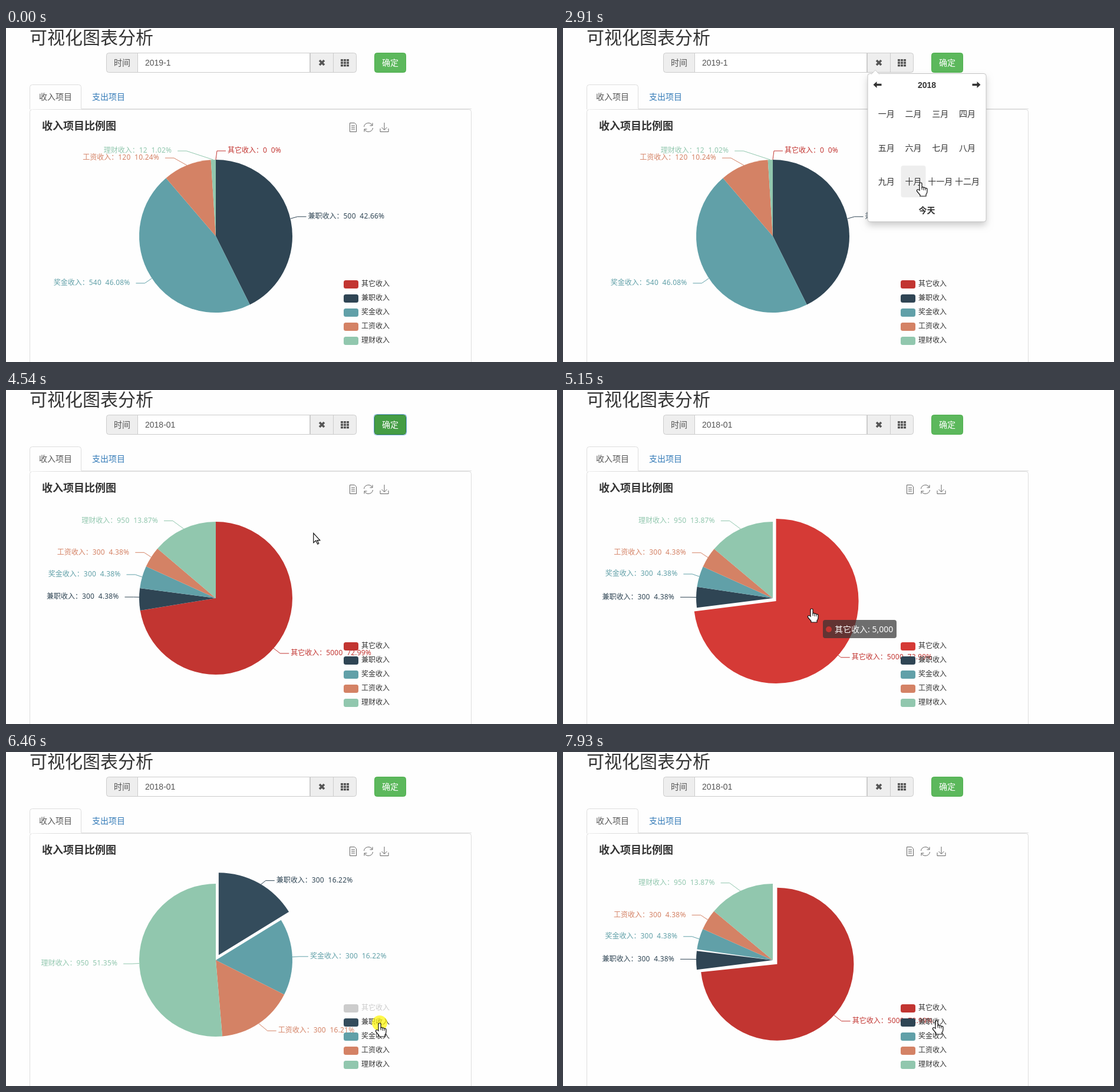
Write an HTML page with a canvas that moves like this. It is 935 px wide and 568 px high and loops after 8 s.

```html
<!DOCTYPE html>
<html lang="zh-CN">
<head>
<meta charset="utf-8">
<style>
html, body { margin: 0; width: 100%; height: 100%; overflow: hidden; background: #fefefe; }
canvas { display: block; }
</style>
</head>
<body>
<canvas id="stage" width="935" height="568"></canvas>
<script>
const ctx = document.getElementById('stage').getContext('2d');
const LOOP = 8000, TAU = Math.PI * 2;
const CHART = '"Noto Sans","Noto Sans CJK SC",sans-serif';
const PAGE = '"Liberation Sans","Noto Sans CJK SC",sans-serif';

// ---------- helpers ----------
const lerp = (a, b, p) => a + (b - a) * p;
const clamp = p => Math.max(0, Math.min(1, p));
const cubicOut = p => 1 - (1 - p) ** 3;
const smooth = p => p * p * (3 - 2 * p);
const elasticOut = p => p >= 1 ? 1 : 2 ** (-10 * p) * Math.sin((p - 0.1) * 5 * Math.PI) + 1;
const within = (t, from, to) => t >= from && t < to;

// Text is placed by its vertical centre.
function text(str, x, cy, { size = 14, color = '#333', font = PAGE, weight = 400, align = 'left' } = {}) {
  ctx.font = `${weight} ${size}px ${font}`;
  ctx.textAlign = align;
  ctx.fillStyle = color;
  ctx.fillText(str, x, cy + size * 0.36);
}

function box(x, y, w, h, radius, fill, stroke) {
  ctx.beginPath();
  ctx.roundRect(x, y, w, h, radius);
  if (fill) { ctx.fillStyle = fill; ctx.fill(); }
  if (stroke) { ctx.strokeStyle = stroke; ctx.lineWidth = 1; ctx.stroke(); }
}

function polyline(color, ...points) {
  ctx.beginPath();
  points.forEach(([x, y]) => ctx.lineTo(x, y));
  ctx.strokeStyle = color;
  ctx.lineWidth = 1;
  ctx.stroke();
}

function shape(path, x, y, fill, stroke, width = 1) {
  ctx.save();
  ctx.translate(x, y);
  const p = new Path2D(path);
  if (fill) { ctx.fillStyle = fill; ctx.fill(p); }
  if (stroke) { ctx.strokeStyle = stroke; ctx.lineWidth = width; ctx.stroke(p); }
  ctx.restore();
}

function disc(x, y, r, fill) {
  ctx.beginPath();
  ctx.arc(x, y, r, 0, TAU);
  ctx.fillStyle = fill;
  ctx.fill();
}

// ---------- pie data ----------
const NAMES = ['其它收入', '兼职收入', '奖金收入', '工资收入', '理财收入'];
const COLORS = ['#c23531', '#2f4554', '#61a0a8', '#d48265', '#91c7ae'];
const CX = 356, CY = 354, R = 130;

const PHASES = [
  { t: -1000, values: [0, 500, 540, 120, 12], picked: -1 },
  { t: 4300, values: [5000, 300, 300, 300, 950], picked: -1 },
  { t: 5040, values: [5000, 300, 300, 300, 950], picked: 0 },
  { t: 5840, values: [null, 300, 300, 300, 950], picked: 1 },
  { t: 6540, values: [null, null, 300, 300, 950], picked: 2 },
  { t: 6900, values: [5000, null, 300, 300, 950], picked: 0 },
  { t: 7770, values: [5000, 300, 300, 300, 950], picked: 0 },
];
const HOVERS = [[0, 4840, 5840], [1, 6060, 6540]];

// Percentages with two decimals that add up to exactly 100.
function percentages(values) {
  const total = values.reduce((a, b) => a + b, 0);
  const exact = values.map(v => v / total * 1e4);
  const units = exact.map(Math.floor);
  const order = exact.map((e, i) => i).sort((a, b) => (exact[b] - units[b]) - (exact[a] - units[a]));
  const missing = 1e4 - units.reduce((a, b) => a + b, 0);
  for (let i = 0; i < missing; i++) units[order[i]]++;
  return units.map(u => u / 100);
}

function layout({ values, picked }) {
  const total = values.reduce((a, b) => a + b, 0);
  const percents = percentages(values);
  let angle = 0;
  const slices = values.map((value, i) => {
    const start = angle, end = angle += value / total * TAU, mid = (start + end) / 2;
    return { value, start, end, mid, percent: percents[i], shift: i === picked ? 10 : 0,
      side: mid < Math.PI ? 1 : -1, labelY: CY - (R + 15) * Math.cos(mid) };
  });
  // Labels on the left keep a line's height between them.
  let lastY = -Infinity;
  slices.filter(s => s.value !== null && s.side < 0).reverse()
    .forEach(s => { lastY = s.labelY = Math.max(s.labelY, lastY + 12); });
  slices.forEach(s => {
    const reach = s.value ? Math.sqrt(160 ** 2 - (s.labelY - CY) ** 2) : 20;
    s.textX = CX + s.side * reach;
    s.edgeX = CX + R * Math.sin(s.mid);
    s.edgeY = CY - R * Math.cos(s.mid);
  });
  return slices;
}
const LAYOUTS = PHASES.map(layout);
const TWEENED = ['start', 'end', 'mid', 'shift', 'labelY', 'textX', 'edgeX', 'edgeY'];

function slicesAt(t) {
  const n = PHASES.findLastIndex(p => t >= p.t);
  const p = cubicOut(clamp((t - PHASES[n].t) / 300));
  return LAYOUTS[n].map((to, i) => {
    let from = n ? LAYOUTS[n - 1][i] : to;
    if (from.value === null) from = { ...to, end: to.start };
    const slice = { ...to, index: i };
    TWEENED.forEach(k => slice[k] = lerp(from[k], to[k], p));
    const hover = HOVERS.find(([k, a, b]) => k === i && within(t, a, b));
    slice.hover = hover ? elasticOut((t - hover[1]) / 300) : 0;
    slice.dx = slice.shift * Math.sin(slice.mid);
    slice.dy = -slice.shift * Math.cos(slice.mid);
    return slice;
  });
}

function lift(hex) {
  const rgb = [1, 3, 5].map(i => Math.min(255, Math.round(parseInt(hex.slice(i, i + 2), 16) * 1.1)));
  return `rgb(${rgb})`;
}

function drawLabel(s) {
  const color = COLORS[s.index], y = s.labelY + s.dy, x = s.textX + s.dx;
  const lineEnd = x - 3 * s.side;
  polyline(color, [s.edgeX + s.dx, s.edgeY + s.dy], [lineEnd - 15 * s.side, y], [lineEnd, y]);
  const style = { size: 12, color, font: CHART };
  const numbers = `${s.value}  ${s.percent}%`;
  ctx.font = `400 12px ${CHART}`;
  ctx.letterSpacing = '0.2px';
  const left = s.side > 0 ? x : x - 7 - 60 - ctx.measureText(numbers).width;
  text(numbers, left + 60, y - 1, style);
  ctx.letterSpacing = '0px';
  text(NAMES[s.index] + '：', left, y - 1, style);
}

function drawSlice(s) {
  if (s.end - s.start < 1e-4) return;
  const x = CX + s.dx, y = CY + s.dy;
  ctx.beginPath();
  ctx.moveTo(x, y);
  ctx.arc(x, y, R + 10 * s.hover, s.start - TAU / 4, s.end - TAU / 4);
  ctx.fillStyle = s.hover ? lift(COLORS[s.index]) : COLORS[s.index];
  ctx.fill();
}

function drawChart(t) {
  text('收入项目比例图', 61, 167, { size: 18, weight: 700, font: CHART });
  shape('M-5.500 -7.500H2.500L5.500 -4.500V7.500H-5.500ZM-3 -3H3M-3 0H3M-3 3H3', 589, 169, null, '#666');
  shape('M-7.500 -1A7.500 7.500 0 0 1 6.500 -3.500M7 -7.500V-3H2.500M7.500 1A7.500 7.500 0 0 1 -6.500 3.500M-7 7.500V3H-2.500', 615, 169, null, '#666');
  shape('M-7 2V7.500H7V2M0 -8V4M-4.500 0L0 4.500L4.500 0', 642, 169, null, '#666');

  const slices = slicesAt(t), visible = slices.filter(s => s.value !== null);
  visible.forEach(drawLabel);
  visible.forEach(drawSlice);
  slices.forEach((s, i) => {
    const y = 429 + 24 * i, on = s.value !== null;
    box(573, y, 25, 14, 3.5, on ? (s.hover ? lift(COLORS[i]) : COLORS[i]) : '#ccc');
    text(NAMES[i], 603, y + 6, { size: 12, color: on ? '#333' : '#ccc', font: CHART });
  });
}

function drawLoading(t) {
  const p = (t - 3990) / 1000;
  const turn = 0.5 * (1 - Math.sqrt(1 - 4 * p * p));
  ctx.fillStyle = 'rgba(255,255,255,.8)';
  ctx.fillRect(41, 139, 748, 429);
  ctx.beginPath();
  ctx.arc(CX, CY, 10, -TAU / 4, -TAU / 4 + lerp(0.1, TAU, turn));
  ctx.strokeStyle = COLORS[0];
  ctx.lineWidth = 5;
  ctx.lineCap = 'round';
  ctx.stroke();
  ctx.lineCap = 'butt';
  text('loading', 376, 353, { size: 12, color: '#000', font: CHART });
}

// ---------- page ----------
function drawPage(t) {
  text('可视化图表分析', 40, 16.500, { size: 30 });

  box(170.5, 42.5, 424, 33, 4, '#eee', '#ccc');
  const focused = within(t, 600, 1440);
  ctx.save();
  if (focused) { ctx.shadowColor = 'rgba(102,175,233,.6)'; ctx.shadowBlur = 8; }
  box(223.5, 42.5, 292, 33, 0, '#fff', focused ? '#66afe9' : '#ccc');
  ctx.restore();
  polyline('#ccc', [516.5, 43], [516.5, 75]);
  polyline('#ccc', [555.5, 43], [555.5, 75]);
  text('时间', 183, 59, { color: '#555' });
  text(t < 3450 ? '2019-1' : '2018-01', 236, 59, { color: '#555' });
  shape('M-4 -4L4 4M4 -4L-4 4', 536, 59, null, '#555', 3.6);
  ctx.fillStyle = '#555';
  for (let i = 0; i < 9; i++) ctx.fillRect(568 + i % 3 * 5, 53 + Math.floor(i / 3) * 4.5, 4, 3.5);

  const dark = within(t, 3690, 5040);
  box(625.5, 42.5, 53, 33, 4, dark ? '#449d44' : '#5cb85c', dark ? '#398439' : '#4cae4c');
  if (within(t, 3920, 5040)) box(624.5, 41.5, 55, 35, 4, null, '#6aa5dc');
  text('确定', 638, 59, { color: '#fff' });

  polyline('#ddd', [128, 137.5], [790, 137.5]);
  box(40.5, 138.5, 749, 500, 4, '#fefefe', '#ddd');
  shape('M0 42V4Q0 0 4 0H83Q87 0 87 4V41', 40.5, 96.5, '#fefefe', '#ddd');
  text('收入项目', 56, 117, { color: '#555' });
  text('支出项目', 146, 117, { color: '#337ab7' });
}

// ---------- date picker ----------
const MONTHS = ['一', '二', '三', '四', '五', '六', '七', '八', '九', '十', '十一', '十二'].map(m => m + '月');
const YEARS = Array.from({ length: 12 }, (_, i) => String(2009 + i));
const VIEWS = [
  { from: 600, to: 1440, x: 508, title: '2019', cells: MONTHS, active: 0 },
  { from: 1440, to: 2830, x: 508, title: '2010-2019', cells: YEARS, active: 10 },
  { from: 2830, to: 3450, x: 516.5, title: '2018', cells: MONTHS, active: -1 },
];

function drawPicker(t, mouse) {
  const view = VIEWS.find(v => within(t, v.from, v.to));
  if (!view) return;
  const { x, title, cells, active } = view;
  const over = (bx, by, w, h) => within(mouse.x, bx, bx + w) && within(mouse.y, by, by + h);
  ctx.save();
  ctx.shadowColor = 'rgba(0,0,0,.2)';
  ctx.shadowBlur = 12;
  ctx.shadowOffsetY = 6;
  box(x + 0.5, 77.5, 201, 252, 4, '#fff');
  ctx.restore();
  box(x + 0.5, 77.5, 201, 252, 4, null, '#c4c4c4');
  shape('M-6.500 7L0 0L6.500 7', x + 13.5, 71.5, '#fff', '#ccc');

  if (over(x + 32, 82, 137, 30)) box(x + 32, 82, 137, 30, 4, '#eee');
  text(title, x + 101, 97, { weight: 700, align: 'center' });
  const arrow = 'M-7 0L-1 -5.500V-1.800H7V1.800H-1V5.500Z';
  shape(arrow, x + 17, 96.5, '#333');
  ctx.save();
  ctx.translate(x + 185, 96.5);
  ctx.scale(-1, 1);
  shape(arrow, 0, 0, '#333');
  ctx.restore();

  cells.forEach((label, i) => {
    const cx = x + 32.3 + 45.7 * (i % 4), cy = 146 + 57.5 * Math.floor(i / 4);
    const rect = [cx - 21, cy - 27, 42, 54];
    if (i === active) {
      const blue = ctx.createLinearGradient(0, cy - 27, 0, cy + 27);
      blue.addColorStop(0, '#0088cc');
      blue.addColorStop(1, '#0044cc');
      box(...rect, 4, blue);
    } else if (over(...rect)) box(...rect, 4, '#eee');
    text(label, cx, cy, { align: 'center', color: i === active ? '#fff' : '#333' });
  });
  text('今天', x + 101, 310, { weight: 700, align: 'center' });
}

// ---------- pointer ----------
const POINTERS = {
  arrow: 'M0 0V16L4 12.500L7 18.500L9 17.500L6.300 12H11Z',
  hand: 'M-2 13V2Q-2 0 0 0Q2 0 2 2V8Q4 6.500 5 8.500Q7 7.500 8 9.500Q11 9 11 11V15Q11 18 9 20V23H-1V21L-6.500 14.500Q-7 12 -5 11.500Q-3.500 11.500 -2 13Z',
  knuckles: 'M2 8V12M5 9V13M8 10V13',
  beam: 'M-3 -8H3M0 -8V8M-3 8H3',
};
const MOVES = [
  [130, 872, 270], [440, 396, 51], [650, 396, 51], [1360, 608, 97], [1470, 608, 97],
  [1750, 574, 149], [2050, 548, 150], [2180, 548, 150], [2450, 607, 263], [2920, 607, 263],
  [3220, 548, 146], [3460, 548, 146], [3750, 666, 58], [4080, 666, 58], [4900, 422, 372],
  [5600, 422, 372], [5780, 638, 436], [5920, 638, 436], [6070, 634, 461], [6580, 634, 461],
  [6800, 638, 436], [7380, 638, 436], [7560, 634, 457], [LOOP, 634, 457],
];
const CLICKS = [590, 1400, 2600, 3420, 3910, 5030, 5800, 6460, 6850, 7690];

function pointerAt(t) {
  const n = Math.max(1, MOVES.findIndex(m => t < m[0]));
  const [t0, x0, y0] = MOVES[n - 1], [t1, x1, y1] = MOVES[n];
  const p = smooth(clamp((t - t0) / (t1 - t0)));
  return { x: lerp(x0, x1, p), y: lerp(y0, y1, p) };
}

function pointerKind(t, { x, y }) {
  if (within(x, 224, 516) && within(y, 43, 76)) return 'beam';
  const onPicker = within(t, 600, 3450) && x > 508 && y > 80;
  const onButton = within(x, 625, 680) && within(y, 42, 77);
  const onPie = t > 4000 && Math.hypot(x - CX, y - CY) < R + 10;
  const onLegend = t > 4000 && within(x, 573, 652) && within(y, 428, 540);
  return onPicker || onButton || onPie || onLegend ? 'hand' : 'arrow';
}

function drawPointer(t, { x, y }) {
  if (t < 130) return;
  if (CLICKS.some(c => within(t, c, c + 75))) disc(x, y, 13, 'rgba(255,245,0,.7)');
  const kind = pointerKind(t, { x, y });
  shape(POINTERS[kind], x, y, kind === 'beam' ? null : '#fff', '#111', 1.2);
  if (kind === 'hand') shape(POINTERS.knuckles, x, y, null, '#111');
}

function drawTooltip(t, mouse) {
  if (!within(t, 4850, 5680)) return;
  const x = mouse.x + 19, y = mouse.y + 19;
  box(x, y, 125, 31, 4, 'rgba(50,50,50,.7)');
  disc(x + 10, y + 16, 5, COLORS[0]);
  text('其它收入: 5,000', x + 20, y + 16, { color: '#fff', font: CHART });
}

function draw(now) {
  const t = now % LOOP, mouse = pointerAt(t);
  ctx.fillStyle = '#fefefe';
  ctx.fillRect(0, 0, 935, 568);
  drawPage(t);
  drawChart(t);
  if (within(t, 3990, 4300)) drawLoading(t);
  drawTooltip(t, mouse);
  drawPicker(t, mouse);
  drawPointer(t, mouse);
}

let began;
function frame(now) {
  began ??= now;
  draw(now - began);
  requestAnimationFrame(frame);
}
requestAnimationFrame(frame);
</script>
</body>
</html>
```
